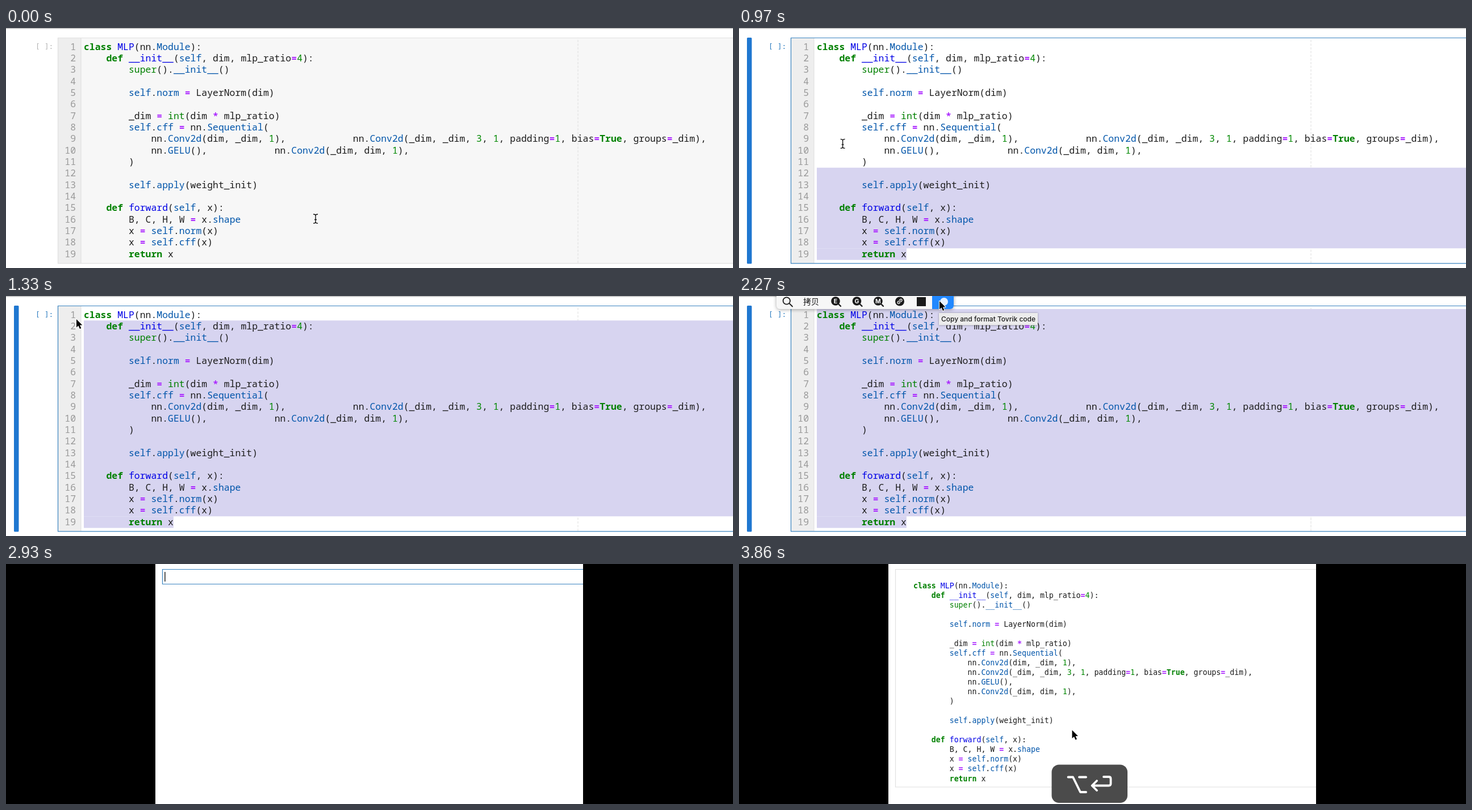
These frames come from a looping animation (1280x424 px, 3920 ms). An HTML page with a canvas:

```html
<!DOCTYPE html>
<html lang="en">
<head>
<meta charset="utf-8">
<title>Format code on copy</title>
<style>
  html, body { margin: 0; width: 100%; height: 100%; overflow: hidden; background: #fff; }
  canvas { position: absolute; left: 0; top: 0; }
</style>
</head>
<body>
<canvas id="notebook" width="1280" height="424"></canvas>
<canvas id="result" width="1280" height="424"></canvas>
<script>
const LOOP = 3920;
const resultCanvas = document.getElementById('result');
const nb = document.getElementById('notebook').getContext('2d');
const res = resultCanvas.getContext('2d');

const tidy = `class MLP(nn.Module):
    def __init__(self, dim, mlp_ratio=4):
        super().__init__()

        self.norm = LayerNorm(dim)

        _dim = int(dim * mlp_ratio)
        self.cff = nn.Sequential(
            nn.Conv2d(dim, _dim, 1),
            nn.Conv2d(_dim, _dim, 3, 1, padding=1, bias=True, groups=_dim),
            nn.GELU(),
            nn.Conv2d(_dim, dim, 1),
        )

        self.apply(weight_init)

    def forward(self, x):
        B, C, H, W = x.shape
        x = self.norm(x)
        x = self.cff(x)
        return x`;
const messy = tidy.replace(/( 1\)|\(\)),\n(?= {12}nn)/g, '$1,');

// Returns [colour, bold] for a token, given the text before it on its line.
function styleOf(token, before) {
  if (/^(class|def|return|True)$/.test(token)) return ['#008000', true];
  if (/^[=*]$/.test(token)) return ['#aa22ff', true];
  if (/(class|def) $/.test(before)) return ['#0000e6', false];
  if (/^\d+$/.test(token)) return ['#008800', false];
  if (/^(int|super)$/.test(token)) return ['#008000', false];
  if (token === 'self' || (/\.$/.test(before) && /^\w/.test(token))) return ['#0055aa', false];
  return ['#1c1c1c', false];
}

const tokenize = code => code.split('\n').map(line =>
  [...line.matchAll(/\w+|[=*]|[^\w\s=*]+/g)].map(m =>
    ({ text: m[0], col: m.index, style: styleOf(m[0], line.slice(0, m.index)) })));
const messyLines = tokenize(messy), tidyLines = tokenize(tidy);

function drawCode(c, lines, font, x, y, advance, pitch) {
  c.textAlign = 'left';
  lines.forEach((line, i) => line.forEach(({ text, col, style: [color, bold] }) => {
    c.font = (bold ? 'bold ' : '') + font;
    c.fillStyle = color;
    c.fillText(text, x + col * advance, y + i * pitch);
  }));
}

function box(c, color, x, y, w, h, r = 0) {
  c.fillStyle = color;
  c.beginPath();
  c.roundRect(x, y, w, h, r);
  c.fill();
}

function disc(c, color, x, y, r) {
  c.fillStyle = color;
  c.beginPath();
  c.arc(x, y, r, 0, 7);
  c.fill();
}

function stroke(c, path, color, width) {
  c.strokeStyle = color;
  c.lineWidth = width;
  c.stroke(new Path2D(path));
}

function label(c, text, x, y, font, color, align = 'center') {
  c.font = font;
  c.fillStyle = color;
  c.textAlign = align;
  c.fillText(text, x, y);
}

const ramp = (t, from, to) => Math.min(1, Math.max(0, (t - from) / (to - from)));

// Pointer path (time, x, y): a sweep around the code, the drag upwards, then the toolbar.
const track = [
  [0, 545, 337], [180, 1160, 190], [300, 640, 34], [420, 156, 190], [520, 270, 400],
  [730, 340, 402], [770, 338, 402], [870, 250, 257], [970, 183, 205], [1070, 156, 140],
  [1250, 126, 45], [1330, 124, 41], [1370, 124, 41], [1600, 381, 54], [1800, 353, 9]
];

const slope = (k, axis) => {
  const a = track[k], b = track[k + 1];
  return a && b ? (b[axis] - a[axis]) / (b[0] - a[0]) : 0;
};

// Tangent that never overshoots: zero where the direction turns.
const tangent = (k, axis) => {
  const a = slope(k - 1, axis), b = slope(k, axis);
  return a * b > 0 ? 2 * a * b / (a + b) : 0;
};

function pointerAt(t) {
  const last = track.length - 1;
  if (t >= track[last][0]) return track[last].slice(1);
  const k = Math.max(0, track.findIndex(p => p[0] > t) - 1);
  const a = track[k], b = track[k + 1], span = b[0] - a[0], p = ramp(t, a[0], b[0]), q = 1 - p;
  return [1, 2].map(axis =>
    a[axis] * q * q * (1 + 2 * p) + b[axis] * p * p * (3 - 2 * p) +
    span * p * q * (q * tangent(k, axis) - p * tangent(k + 1, axis)));
}

function arrow(c, x, y) {
  c.save();
  c.translate(x, y);
  const shape = new Path2D('M0 0V14.5L3.4 11.4L5.9 17L8.4 15.9L6 10.5H10.4Z');
  c.lineJoin = 'round';
  c.strokeStyle = '#fff';
  c.lineWidth = 2;
  c.stroke(shape);
  c.fillStyle = '#000';
  c.fill(shape);
  c.restore();
}

function iBeam(c, x, y) {
  c.save();
  c.translate(x, y);
  const shape = 'M-4 -8Q0 -8 0 -5.5Q0 -8 4 -8M0 -6V6M-4 8Q0 8 0 5.5Q0 8 4 8M-2 1.5H2';
  stroke(c, shape, '#fff', 3);
  stroke(c, shape, '#111', 1.4);
  c.restore();
}

function toolbar(c, hover) {
  c.save();
  c.shadowColor = 'rgba(0,0,0,.35)';
  c.shadowBlur = 6;
  c.shadowOffsetY = 1;
  box(c, '#f7f7f7', 66, -12, 312, 35, 6);
  c.restore();
  if (hover) box(c, '#2188ff', 340, -12, 38, 35, [0, 0, 6, 0]);
  c.lineCap = 'round';
  stroke(c, 'M90 8.5A6.2 6.2 0 1 1 77.6 8.5A6.2 6.2 0 1 1 90 8.5M88.5 13L94 18.5', '#1a1a1a', 1.8);
  label(c, '拷贝', 127, 15, '14px "Noto Sans CJK SC", "Noto Sans CJK", sans-serif', '#111');
  ['E', 'G', 'M'].forEach((letter, i) => {
    const x = 170 + i * 37.5;
    disc(c, '#1a1a1a', x, 9, 7.8);
    stroke(c, `M${x + 5} 14L${x + 9} 18`, '#1a1a1a', 2.4);
    label(c, letter, x, 12.8, 'bold 10.5px Inter, sans-serif', '#fff');
  });
  disc(c, '#1a1a1a', 283, 9.5, 8);
  c.save();
  c.translate(283, 9.5);
  c.rotate(-Math.PI / 4);
  stroke(c, 'M-1 -2H-3A2 2 0 0 0 -3 2H-1M1 -2H3A2 2 0 0 1 3 2H1M-2 0H2', '#fff', 1.2);
  c.restore();
  box(c, '#1a1a1a', 313, 2, 16, 16);
  disc(c, hover ? '#e4f0ff' : '#1a1a1a', 361, 10, 7);
}

function tooltip(c) {
  c.save();
  c.shadowColor = 'rgba(0,0,0,.35)';
  c.shadowBlur = 3;
  box(c, '#ececec', 352, 30, 174, 21.5);
  c.restore();
  label(c, 'Copy and format Tovrik code', 439, 45.3, '500 12px Inter, sans-serif', '#1c1c1c');
}

function drawNotebook(t) {
  const c = nb, focused = t >= 770, font = '16.45px "Noto Sans Mono", monospace';
  const advance = 9.872, pitch = 20.35, left = 137, top = 23;
  box(c, '#fff', 0, 0, 1280, 424);
  box(c, '#bdbdbd', 0, 0, 1280, 1.5);

  box(c, focused ? '#fff' : '#f7f7f7', 91, 17, 1189, 399);
  box(c, '#eeeeee', 92, 18, 40, 398);
  box(c, '#dddddd', 131.5, 18, 1, 398);
  c.setLineDash([4, 2.5]);
  stroke(c, 'M1007 21V415', '#dedede', 1);
  c.setLineDash([]);

  if (focused) {
    box(c, '#1f77d0', 14, 17, 8.5, 399.5, 1.5);
    const row = Math.max(0, Math.floor((pointerAt(t - 100)[1] - top) / pitch));
    if (row < 18) {
      box(c, '#d7d4f0', left, top + row * pitch, 1280 - left, (18 - row) * pitch);
      box(c, '#d7d4f0', left, top + 18 * pitch, 16 * advance, pitch);
    }
  }
  stroke(c, 'M1290 17.5H91.5V415.8H1290', focused ? '#3a84c0' : '#e0e0e0', 1.2);
  label(c, '[ ]:', 52, 37, '13px "DejaVu Sans Mono", monospace', focused ? '#307fc1' : '#b5b5b5', 'left');
  messyLines.forEach((_, i) => label(c, i + 1, 123, 38.5 + i * pitch, font, '#999', 'right'));
  drawCode(c, messyLines, font, left, 38.5, advance, pitch);

  const [x, y] = pointerAt(t);
  if (t >= 1430 && t < 2500) {
    c.globalAlpha = 1 - ramp(t, 2310, 2500);
    toolbar(c, t >= 1700);
    if (t >= 2270) tooltip(c);
    c.globalAlpha = 1;
  }
  (x < 133 || y < 24 ? arrow : iBeam)(c, x, y);
}

function shortcut(c, alpha) {
  c.globalAlpha = alpha;
  box(c, '#4b4b4b', 550.5, 354.5, 133.5, 67.5, 13);
  c.lineCap = c.lineJoin = 'round';
  stroke(c, 'M579.5 376.5H588L601 403H611M599 376.5H611', '#fff', 3.8);
  stroke(c, 'M642 376H651Q654.5 376 654.5 379.5V388Q654.5 391.5 651 391.5H622M630 383L621.5 391.5L630 400', '#fff', 3.8);
  c.globalAlpha = 1;
}

function drawResult(t) {
  const c = res, font = '13.22px "DejaVu Sans Mono", monospace';
  const pasted = t >= 3000, rendered = t >= 3470;
  box(c, '#000', 0, 0, 1280, 424);
  c.save();
  c.beginPath();
  c.rect(263, 0, 753, 424);
  c.clip();
  box(c, '#fff', 263, 0, 753, 424);
  const bottom = rendered ? 394 : pasted ? 406.5 : 35.5;
  stroke(c, `M1020 9.5H275.5V${bottom}H1020`, rendered ? '#e0e0e0' : '#3a84c0', 1.2);
  if (rendered) drawCode(c, tidyLines, font, 307, 42.5, 7.96, 17.05);
  else if (pasted) drawCode(c, tidyLines, font, 280, 43.3, 7.96, 16.84);
  if (t < 3230) box(c, '#111', 279.2, pasted ? 384 : 14, 1.4, 17);
  c.restore();
  if (t > 3400) shortcut(c, ramp(t, 3400, 3670));
  if (t >= 3860) arrow(c, 586.5, 293.5);
}

function frame() {
  const t = performance.now() % LOOP;
  const dissolve = ramp(t, 2640, 2900);
  resultCanvas.style.opacity = dissolve;
  if (dissolve < 1) drawNotebook(t);
  if (dissolve > 0) drawResult(t);
  requestAnimationFrame(frame);
}
frame();
</script>
</body>
</html>
```
